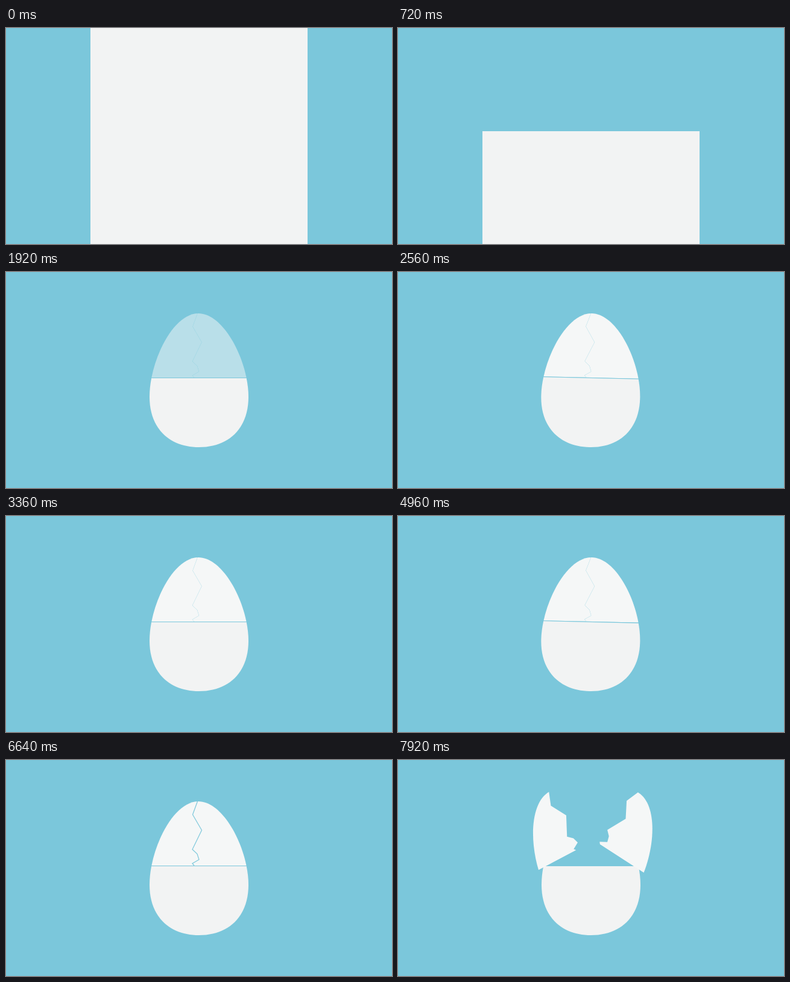
These frames come from a looping animation (640x360 px, 8000 ms). An HTML page:

```html
<!DOCTYPE html>
<html lang="en">
<head>
<meta charset="utf-8">
<title>Hatching egg</title>
<style>
  html, body { margin: 0; width: 100%; height: 100%; overflow: hidden; background: #7bc7db; }
  svg { display: block; width: 100vw; height: 100vh; }
  #bowl { fill: #f2f3f3; }
  #left, #right { fill: #f5f7f7; }
  #crack { fill: none; stroke: #7bc7db; }
</style>
</head>
<body>
<svg viewBox="0 0 640 360">
  <defs>
    <path id="egg" d="M238 208C238 150 276 69 319 69C362 69 402 150 402 208C402 262 368 292 320 292C272 292 238 262 238 208Z"/>
    <clipPath id="view"><rect x="140" width="360" height="360"/></clipPath>
    <clipPath id="lower"><path d="M200 177H440V320H200Z"/></clipPath>
    <clipPath id="leftClip"><path id="leftCut"/></clipPath>
    <clipPath id="rightClip"><path id="rightCut"/></clipPath>
  </defs>
  <g clip-path="url(#view)">
    <g id="bowl"><use href="#egg" clip-path="url(#lower)"/></g>
    <g id="cap">
      <g id="left"><use href="#egg" clip-path="url(#leftClip)"/></g>
      <g id="right"><use href="#egg" clip-path="url(#rightClip)"/></g>
      <path id="crack"/>
    </g>
  </g>
</svg>
<script>
const LOOP = 8000;
const ZOOM_START = 118, ZOOM_TIME = 1600;
const WOBBLES = [2547, 4947], WOBBLE_TIME = 800;
const OPEN_START = 7347, OPEN_TIME = 573;

const $ = id => document.getElementById(id);
const set = (id, name, value) => $(id).setAttribute(name, value);
const progress = (t, start, time) => Math.min(1, Math.max(0, (t - start) / time));
const rotate = (id, angle, x, y) => set(id, 'transform', `rotate(${angle} ${x} ${y})`);

const crack = 'L317.5 69L309.5 91L324.5 117L309 149L317 156.5L320 166L309 172.5L312 176';
set('leftCut', 'd', `M200 40L317.5 40${crack}L200 176Z`);
set('rightCut', 'd', `M440 40L317.5 40${crack}L440 176Z`);
set('crack', 'd', 'M' + crack.slice(1));

// The camera pulls back at constant speed, so scale is inverse to time.
function zoom(t) {
  return ZOOM_TIME / Math.min(ZOOM_TIME, Math.max(4, t - ZOOM_START));
}

function draw(t) {
  let tilt = 0, slip = 0;
  for (const start of WOBBLES) {
    const u = progress(t, start, WOBBLE_TIME);
    tilt += 12 * Math.sin(2 * Math.PI * u);
    slip -= 1.2 * Math.sin(Math.PI * u);
  }
  set('bowl', 'transform',
    `translate(320 180) scale(${zoom(t)}) rotate(${tilt}) translate(-320 -180)`);
  rotate('cap', tilt + slip, 320, 180);
  set('cap', 'opacity', progress(t, 1778, 280));

  const open = progress(t, OPEN_START, OPEN_TIME);
  rotate('left', -28 * open, 252, 196);
  rotate('right', 33 * open, 383, 197);

  const split = progress(t, 6500, 120);
  set('crack', 'opacity', open > 0 ? 0 : 0.15 + 0.75 * split);
  set('crack', 'stroke-width', 0.8 + 0.5 * split);
}

const began = performance.now();
function tick() {
  draw((performance.now() - began) % LOOP);
  requestAnimationFrame(tick);
}
tick();
</script>
</body>
</html>
```
